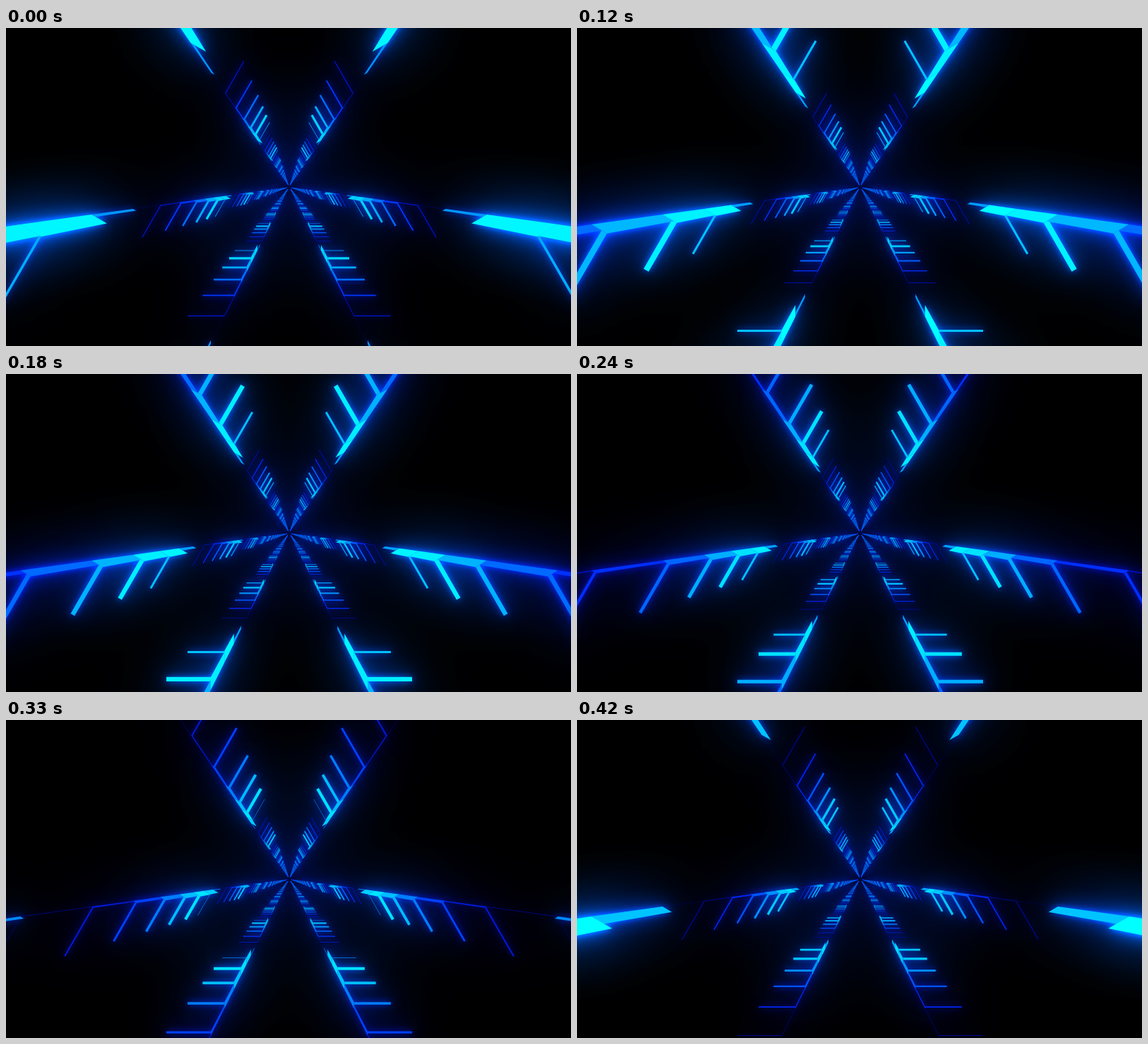
An HTML page with a canvas that plays this animation: 800x450 px, repeating every 0.45 s.

```html
<!DOCTYPE html>
<html lang="en">
<head>
<meta charset="utf-8">
<title>Neon tunnel</title>
<style>
html, body { margin: 0; width: 100%; height: 100%; overflow: hidden; background: #000; }
canvas { display: block; width: 100vw; height: 100vh; }
</style>
</head>
<body>
<canvas id="stage" width="800" height="450"></canvas>
<script>
const W = 800, H = 450;
const LOOP = 450, STEP = 30, LEAD = 8;   // LEAD keeps clock jitter off the step edges
const SLOT = LOOP / 8;                   // time the pulse needs per slot
const NEAR = -4, FAR = 320, GLOW_FAR = 70;
const VX = 401, VY = 225, DROP = 30.5;   // vanishing point, axis below eye line
const INNER = 111, OUTER = 174, RIM = 191.5;
const PAD = 40, HALF = 0.5;              // margin and scale of the glow layers

const clamp = x => Math.min(1, Math.max(0, x));
const mod = (a, n) => ((a % n) + n) % n;
const scaleAt = k => 1 / (1 + 0.2093 * k);

// Each profile depends on the age in ms since the pulse reached the slot.
const fall = age => (1 + Math.cos(Math.PI * clamp((age - 75) / 345))) / 2;
const wallDepth = age => 0.5 + 19.5 * clamp(age / 75) * fall(age);
const barGrowth = age => clamp((age - 60) / 55);
const barDepth = age => 8.2 * barGrowth(age) * clamp(1 - (age - 60) / 355);

function colour(age, s, tint) {
  const green = age < 80 ? 120 + 1.7 * age : 255 * Math.exp(-(((Math.max(age, 100) - 100) / 165) ** 2));
  const blue = 255 - Math.max(0, age - 314) * 0.95;
  return `rgb(0,${Math.round(green * tint * Math.min(1, s ** 0.2))},${Math.round(blue)})`;
}

function project(side, x, r, s) {
  const a = side * Math.PI * 2 / 3, c = Math.cos(a), n = Math.sin(a);
  return [VX + s * (x * c - r * n), VY + s * (x * n + r * c + DROP)];
}

// Adds a shape to the path on all three sides, mirrored.
function addShape(g, corners) {
  for (let side = 0; side < 3; side++) {
    for (const m of [-1, 1]) {
      corners.forEach(([x, r, s], i) => {
        const p = project(side, x * m, r, s);
        if (i) g.lineTo(...p); else g.moveTo(...p);
      });
      g.closePath();
    }
  }
}

function drawTunnel(g, t, tint, far) {
  for (let k = far; k >= NEAR; k--) {
    const age = mod(t - 38 - SLOT * k, LOOP);
    const s = scaleAt(k), next = scaleAt(k + 1);
    const lo = RIM - wallDepth(age), thick = barDepth(age);

    g.fillStyle = colour(age, s, tint);
    g.beginPath();
    addShape(g, [[INNER, lo, s], [INNER, RIM, s], [INNER, RIM, next], [INNER, lo, next]]);
    g.fill();

    if (thick > 0) {
      g.fillStyle = colour(age, s, tint * (0.6 + 0.4 * barGrowth(age)));
      g.beginPath();
      addShape(g, [[INNER, lo, s], [OUTER, lo, s], [OUTER, lo + thick, s], [INNER, lo + thick, s]]);
      g.fill();
    }
  }
}

function makeLayer() {
  const c = document.createElement('canvas');
  c.width = (W + PAD * 2) * HALF;
  c.height = (H + PAD * 2) * HALF;
  return c.getContext('2d');
}

const light = makeLayer(), glow = makeLayer();
const stage = document.getElementById('stage').getContext('2d');

function drawGlow(t) {
  const { width, height } = glow.canvas;
  light.setTransform(1, 0, 0, 1, 0, 0);
  light.clearRect(0, 0, width, height);
  light.setTransform(HALF, 0, 0, HALF, PAD * HALF, PAD * HALF);
  drawTunnel(light, t, 0.4, GLOW_FAR);

  glow.globalCompositeOperation = 'source-over';
  glow.filter = 'none';
  glow.fillStyle = '#000';
  glow.fillRect(0, 0, width, height);
  glow.globalCompositeOperation = 'lighter';
  for (const [radius, gain] of [[4, 0.8], [14, 1], [42, 1.9]]) {
    glow.filter = `blur(${radius * HALF}px)`;
    for (let left = gain; left > 0; left--) {
      glow.globalAlpha = Math.min(1, left);
      glow.drawImage(light.canvas, 0, 0);
    }
  }
  glow.globalAlpha = 1;
  stage.drawImage(glow.canvas, -PAD, -PAD, W + PAD * 2, H + PAD * 2);
}

const start = performance.now();
let shown = -1;

function tick() {
  const step = Math.floor(mod(performance.now() - start + LEAD, LOOP) / STEP);
  if (step !== shown) {
    shown = step;
    drawGlow(step * STEP);
    drawTunnel(stage, step * STEP, 1, FAR);
  }
  requestAnimationFrame(tick);
}
tick();
</script>
</body>
</html>
```
